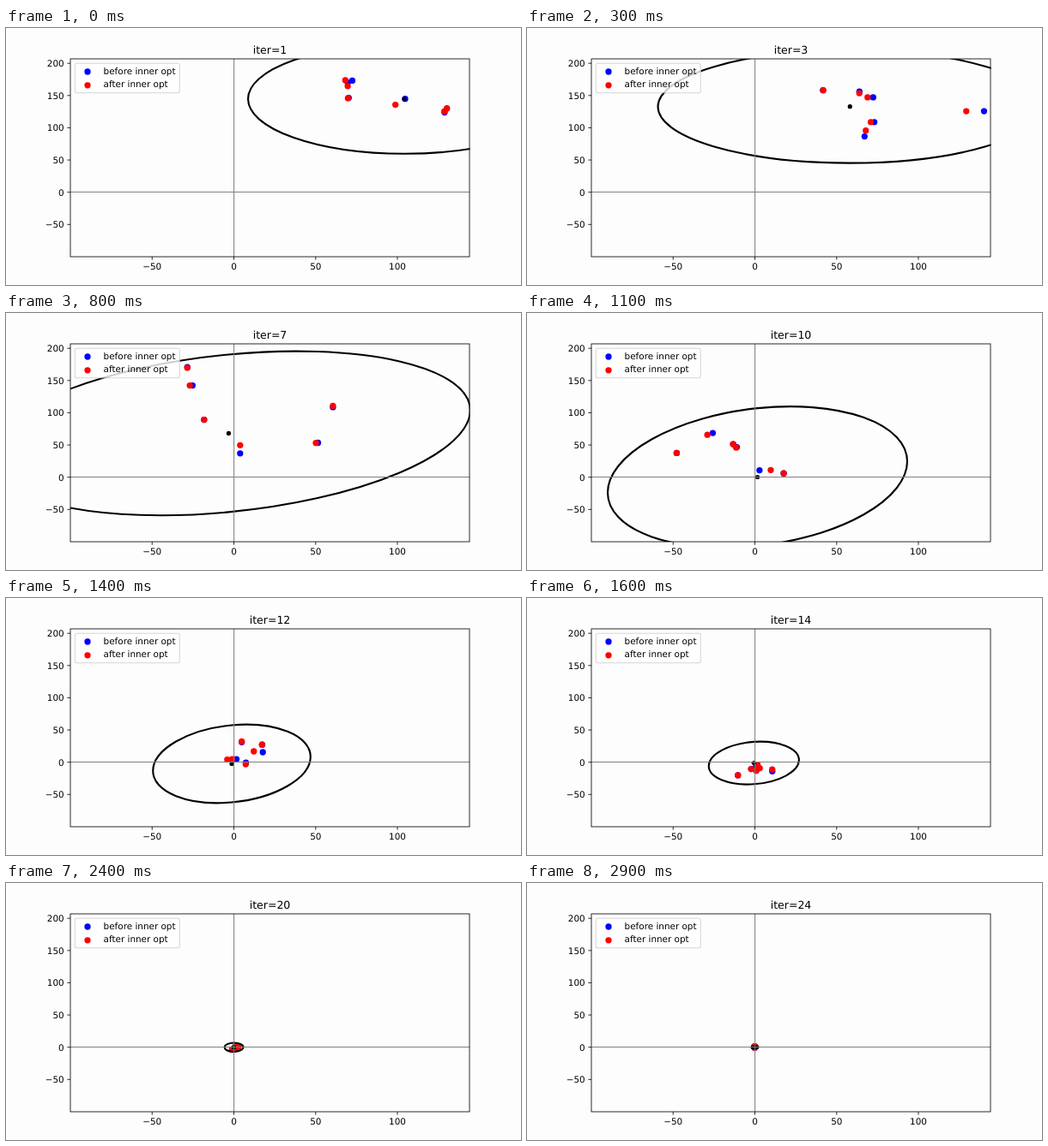
Write an HTML page that moves like this. It is 600x300 px and loops after 3000 ms.

```html
<!DOCTYPE html>
<html lang="en">
<head>
<meta charset="utf-8">
<title>Optimiser iterations</title>
<style>
  html, body { margin: 0; width: 100%; height: 100%; overflow: hidden; background: #fdfdfe; }
  svg { display: block; width: 600px; height: 300px; font: 10.42px "DejaVu Sans", sans-serif; }
  text { text-rendering: geometricPrecision; }
</style>
</head>
<body>
<svg viewBox="0 0 600 300">
  <defs><clipPath id="plot"><rect x="75" y="36" width="465.5" height="231"/></clipPath></defs>
  <g clip-path="url(#plot)">
    <g id="before" fill="#00f"></g>
    <g id="after" fill="#f00"></g>
    <circle id="mean" r="2.6"/>
    <circle id="ring" r="1" fill="none" stroke="#000" stroke-width="2.1" vector-effect="non-scaling-stroke"/>
    <path d="M75 191.6H540M265.6 36V267" stroke="#808080" stroke-width="1.04"/>
  </g>
  <rect x="75" y="36" width="465" height="231" fill="none" stroke="#000" stroke-width=".83"/>
  <g id="ticks" stroke-width=".83"></g>
  <text id="title" x="307.5" y="29.8" font-size="12.5" text-anchor="middle"></text>
  <rect x="80.3" y="41.2" width="122" height="34.6" rx="2" fill="#fff" stroke="#ccc" stroke-width="1.04" opacity=".8"/>
  <circle cx="95" cy="51" r="3.65" fill="#00f"/>
  <circle cx="95" cy="66.8" r="3.65" fill="#f00"/>
  <text x="113.6" y="53.6">before inner opt</text>
  <text x="113.6" y="69.4">after inner opt</text>
</svg>
<script>
const $ = id => document.getElementById(id);
const set = (el, attrs) => {
  for (const key in attrs) el.setAttribute(key, attrs[key]);
  return el;
};
const add = (parent, tag, attrs, text = '') => {
  const el = set(document.createElementNS('http://www.w3.org/2000/svg', tag), attrs);
  el.textContent = text;
  return parent.appendChild(el);
};

const X = v => 265.5 + 1.905 * v;
const Y = v => 191.7 - 0.7525 * v;

for (let v = -50; v <= 200; v += 50) {
  const text = String(v).replace('-', '\u2212');
  add($('ticks'), 'path', { d: `M75 ${Y(v)}h-3.65`, stroke: '#000' });
  add($('ticks'), 'text', { x: 67.7, y: Y(v) + 3.8, 'text-anchor': 'end' }, text);
  if (v > 100) continue;
  add($('ticks'), 'path', { d: `M${X(v)} 267v3.65`, stroke: '#000' });
  add($('ticks'), 'text', { x: X(v), y: 282.3, 'text-anchor': 'middle' }, text);
}

// Key poses of the search region: iteration, centre, half width and height
const keys = [
  { n: 1, cx: 464, cy: 82.8, w: 182, h: 64 },
  { n: 5, cx: 288.5, cy: 100.6, w: 275, h: 68 },
  { n: 6, cx: 273, cy: 109, w: 281, h: 75 },
  { n: 7, cx: 259.4, cy: 140.4, w: 281.4, h: 95.8 },
  { n: 10, cx: 268.5, cy: 191.5, w: 174.5, h: 82.4 },
  { n: 12, cx: 263, cy: 193.5, w: 91.8, h: 45.8 },
  { n: 16, cx: 265.6, cy: 191.7, w: 30.1, h: 13.6 },
  { n: 24, cx: 265.5, cy: 191.7, w: 4, h: 2 }
];

// Centres move linearly, sizes geometrically; the tilt rises until iteration 7, then fades
function regionAt(n) {
  const i = Math.max(1, keys.findIndex(k => k.n >= n));
  const a = keys[i - 1], b = keys[i];
  const t = (n - a.n) / (b.n - a.n);
  const mix = p => a[p] + (b[p] - a[p]) * t;
  const scale = p => a[p] * (b[p] / a[p]) ** t;
  const tilt = n < 7 ? 0.28 * ((n - 1) / 6) ** 4.5 : Math.max(0, 0.28 - 0.02 * (n - 7));
  return { cx: mix('cx'), cy: mix('cy'), w: scale('w'), h: scale('h'), tilt };
}

function random(seed) {
  return () => (seed = (seed * 16807) % 2147483647) / 2147483647;
}

const dots = Array.from({ length: 6 }, () => ({
  before: add($('before'), 'circle', { r: 3.65 }),
  after: add($('after'), 'circle', { r: 3.65 })
}));

// Samples scatter around the previous centre; most inner steps are tiny, a few are long
function scatter(n, w, h) {
  const { cx, cy } = regionAt(Math.max(1, n - 1));
  const rnd = random(n * 7919 + 13);
  const spread = () => (rnd() + rnd() - 1) * 0.65;
  const step = () => (2 * rnd() - 1) ** 5 * 0.12;
  for (const { before, after } of dots) {
    const x = cx + w * spread(), y = cy + h * spread();
    set(after, { cx: x, cy: y });
    set(before, { cx: x + w * step(), cy: y + h * step() });
  }
}

function show(n) {
  const { cx, cy, w, h, tilt } = regionAt(n);
  $('title').textContent = 'iter=' + n;
  set($('mean'), { cx, cy });
  set($('ring'), { transform: `matrix(${w} ${-h * tilt} 0 ${h * Math.sqrt(1 - tilt * tilt)} ${cx} ${cy})` });
  scatter(n, w, h);
}

// 100 ms slots; every fifth one holds the previous iteration
let shown = 0;
function tick() {
  const slot = Math.floor((performance.now() % 3000) / 100);
  const n = slot + 1 - Math.floor((slot + 3) / 5);
  if (n !== shown) show(shown = n);
  requestAnimationFrame(tick);
}
tick();
</script>
</body>
</html>
```
